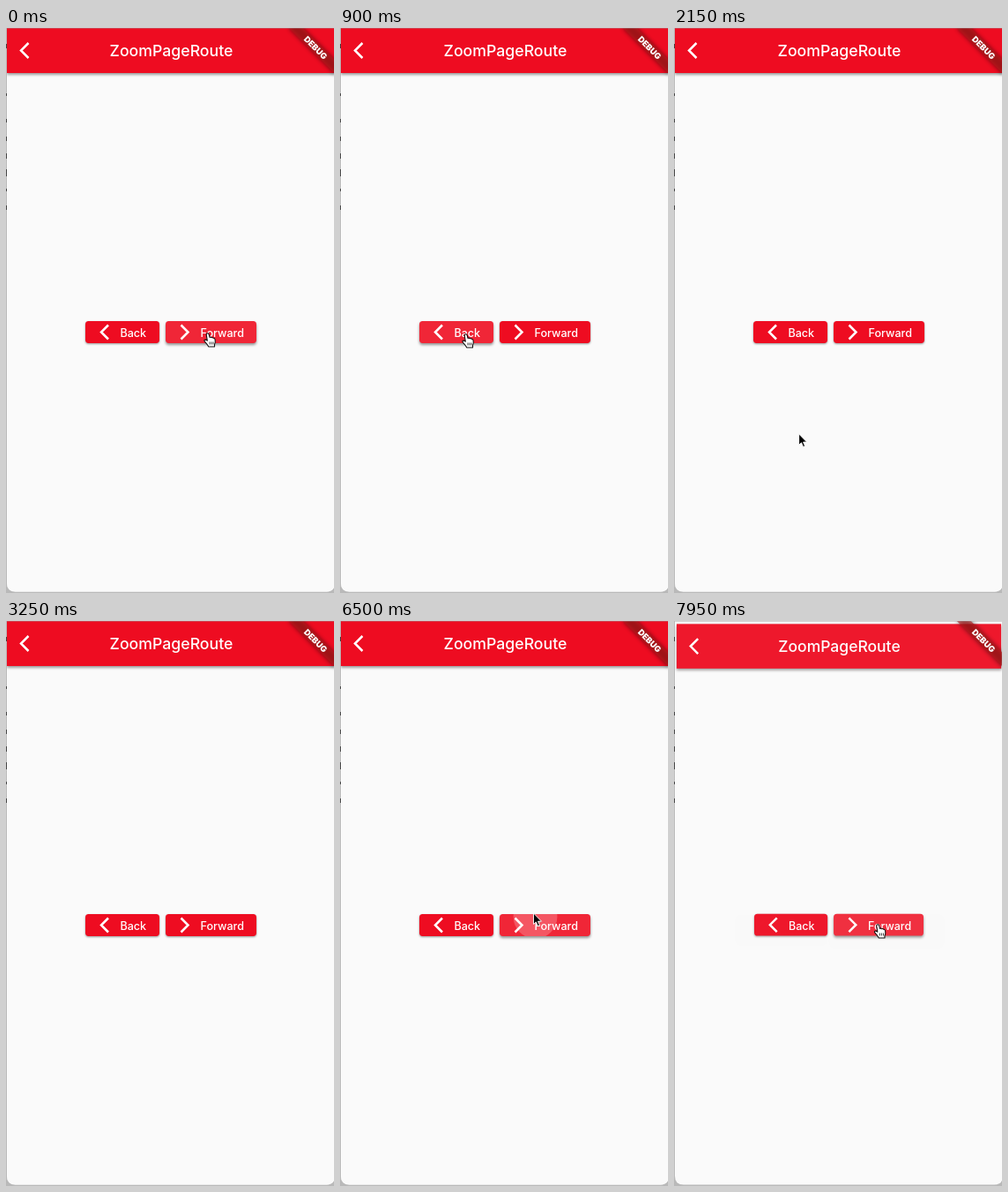
An HTML page that plays this animation: 372x640 px, repeating every 8 s.

```html
<!DOCTYPE html>
<html lang="en">
<head>
<meta charset="utf-8">
<title>ZoomPageRoute</title>
<style>
  html, body { margin: 0; width: 100%; height: 100%; overflow: hidden; background: #b9b9b9; }
  svg { display: block; }
  text { font-family: Inter, Roboto, sans-serif; font-weight: 500; fill: #fff; text-anchor: middle; }
  .title { font-size: 17.7px; }
  .label { font-size: 12.6px; }
  .icon { fill: none; stroke: #fff; stroke-width: 2.5; }
  .bar { fill: #ee0c21; filter: drop-shadow(0 2px 1.8px rgba(0, 0, 0, .38)); }
  .button { fill: #ee0c21; filter: drop-shadow(0 1px 1px rgba(0, 0, 0, .4)); }
  .button.hover { fill: #f02637; filter: drop-shadow(0 2px 1.8px rgba(0, 0, 0, .42)); }
  .ripple { fill: #fff; }
  .banner text { font-size: 9.4px; font-weight: 900; }
</style>
</head>
<body>
<svg width="372" height="640" viewBox="0 0 372 640">
  <defs>
    <clipPath id="window"><path d="M1 0H373V628.500Q373 638.500 363 638.500H11Q1 638.500 1 628.500Z"/></clipPath>
    <clipPath id="buttons">
      <rect x="90" y="332" width="84" height="25" rx="3.700"/>
      <rect x="181" y="332" width="103" height="25" rx="3.700"/>
    </clipPath>
    <filter id="blur" x="-20%" y="-100%" width="140%" height="300%"><feGaussianBlur stdDeviation="2.600"/></filter>
  </defs>

  <rect width="372" height="640" fill="#b9b9b9"/>
  <path d="M.500 18v5M.500 74v3M.500 103v4M.500 123v5M.500 142v6M.500 160v8M.500 182v3M.500 201v5" stroke="#444"/>

  <g clip-path="url(#window)">
    <rect width="373" height="640" fill="#fafafa"/>
    <g class="page">
      <rect x="1" width="372" height="640" fill="#fafafa"/>
      <rect class="bar" x="1" width="372" height="51"/>
      <path class="icon" d="M25.500 17L17 25.500L25.500 34"/>
      <text class="title" x="187.500" y="32">ZoomPageRoute</text>
      <rect class="button back" x="90" y="332" width="84" height="25" rx="3.700"/>
      <rect class="button forward" x="181" y="332" width="103" height="25" rx="3.700"/>
      <g clip-path="url(#buttons)"><circle class="ripple" r="0"/></g>
      <path class="icon" d="M116 336.500L108 344.500L116 352.500M198.500 336.500L206.500 344.500L198.500 352.500"/>
      <text class="label" x="144.300" y="350">Back</text>
      <text class="label" x="245.200" y="350">Forward</text>
    </g>
    <g class="banner" transform="translate(373.500 0) rotate(45)">
      <rect x="-37" y="26" width="74" height="11.200" opacity=".5" filter="url(#blur)"/>
      <rect x="-37" y="26" width="74" height="11.200" fill="#b71c1c" fill-opacity=".63"/>
      <text y="35">DEBUG</text>
    </g>
    <path d="M1 .500H372" stroke="#999" stroke-opacity=".35"/>
  </g>

  <g id="cursor" stroke-linejoin="round">
    <path id="arrow" d="M0 0V12.500L2.900 9.900L4.900 14.600L7 13.700L5 9.200H9Z" fill="#000" stroke="#fff" stroke-width=".9"/>
    <g id="hand">
      <path d="M-1.800 1.200Q-1.500-.5 0-.3Q1 0 1.300 1.500L2 4.400Q3.200 3.600 4 4.700Q5.400 4 6.100 5.300Q7.700 5 8.100 7Q8.800 10 7.500 12.500V15H.8Q-.5 12.500-3 9.800Q-4.700 8-3.700 7.300Q-2.500 6.600-.7 8.200Z" fill="#fff" stroke="#111" stroke-width="1.100"/>
      <path d="M2 9.500V12.500M4 9.500V12.500M6 9.500V12.500" stroke="#111" stroke-width=".8"/>
    </g>
  </g>
</svg>
<script>
const LOOP = 8000, DURATION = 400, CENTER = [187, 320];

// Each navigation: pointer down, start of the transition, direction.
const routes = [
  { press: 340, start: 440, push: false },
  { press: 1140, start: 1240, push: false },
  { press: 6420, start: 6870, push: true },
  { press: 7470, start: 7572, push: true }
];

// Cursor stops: time, x, y.
const stops = [
  [0, 229, 346], [80, 229, 346], [320, 145, 347], [900, 143, 347],
  [1800, 137, 347], [1950, 137, 347], [2450, 150, 665],
  [4850, 205, 665], [5500, 226, 420], [6250, 219.5, 331], [6600, 219.5, 331],
  [7150, 220.5, 334], [7450, 231.5, 344], [8000, 231.5, 344]
];

const $ = selector => document.querySelector(selector);
const lower = $('.page');
const upper = lower.cloneNode(true);
lower.after(upper);

const clamp = v => Math.min(1, Math.max(0, v));
const smooth = v => v * v * (3 - 2 * v);

function pointerAt(t) {
  const i = Math.max(1, stops.findIndex(s => s[0] > t));
  const [t0, x0, y0] = stops[i - 1], [t1, x1, y1] = stops[i];
  const k = smooth(clamp((t - t0) / (t1 - t0)));
  return [x0 + (x1 - x0) * k, y0 + (y1 - y0) * k];
}

function place(page, scale, opacity) {
  const [x, y] = CENTER;
  page.setAttribute('transform', `translate(${x} ${y}) scale(${scale}) translate(${-x} ${-y})`);
  page.setAttribute('opacity', opacity);
  page.style.display = opacity > 0 ? '' : 'none';
}

function setRipple(page, x, y, r, opacity) {
  const circle = page.querySelector('.ripple');
  const values = { cx: x, cy: y, r, opacity };
  for (const name in values) circle.setAttribute(name, values[name]);
}

function render(t) {
  const route = routes.find(r => t >= r.press && t < r.start + DURATION);
  const moving = route && t >= route.start;
  const k = moving ? (t - route.start) / DURATION : 0;
  const p = !moving ? 1 : route.push ? k : 1 - k;
  place(lower, 1 + 0.2 * p, 1 - p);
  place(upper, 0.8 + 0.2 * p, p);

  for (const page of [lower, upper]) setRipple(page, 0, 0, 0, 0);
  if (route) {
    const [x, y] = pointerAt(route.press);
    const age = t - route.press;
    const fade = clamp(age / 75) * (1 - clamp((t - route.start) / 225));
    setRipple(moving && route.push ? lower : upper, x + 2, y + 4, Math.min(70, 16 + age * 0.11), 0.22 * fade);
  }

  const [x, y] = pointerAt(t);
  const inRow = y >= 329 && y <= 360;
  const onBack = inRow && x >= 90 && x <= 174;
  const onForward = inRow && x >= 181 && x <= 284;
  for (const page of [lower, upper]) {
    page.querySelector('.back').classList.toggle('hover', onBack);
    page.querySelector('.forward').classList.toggle('hover', onForward);
  }
  const pointing = (onBack || onForward) && y >= 332;
  $('#hand').style.display = pointing ? '' : 'none';
  $('#arrow').style.display = pointing ? 'none' : '';
  $('#cursor').setAttribute('transform', `translate(${x} ${y})`);
}

const begin = performance.now();
function tick() {
  render((performance.now() - begin) % LOOP);
  requestAnimationFrame(tick);
}
tick();
</script>
</body>
</html>
```
